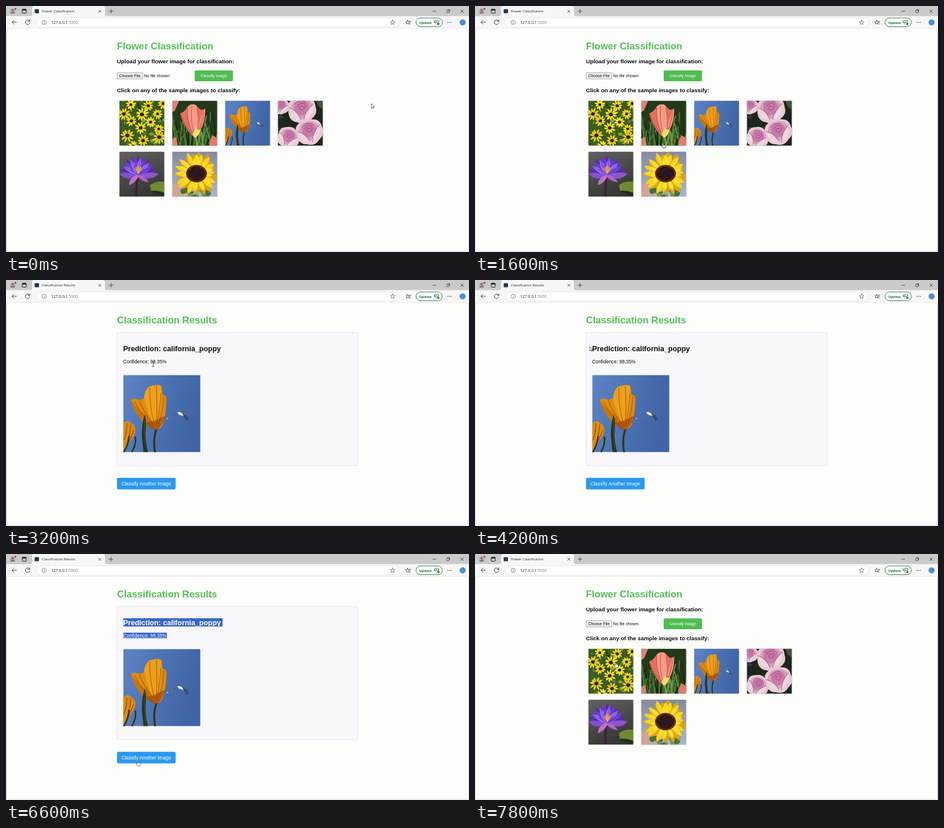
Recreate the animation shown at these times as an HTML page. Size 800 by 425 pixels, loop 8 s.

```html
<!DOCTYPE html>
<html lang="en">
<head>
<meta charset="utf-8">
<title>Flower Classification</title>
<style>
html, body { margin: 0; width: 100%; height: 100%; overflow: hidden; background: #efefef; }
#stage { display: block; width: 100vw; height: 100vh; }
text { font-family: "Liberation Sans", Arial, sans-serif; white-space: pre; }
.ui { font-family: "Open Sans", "Noto Sans", sans-serif; }
</style>
</head>
<body>
<svg id="stage" viewBox="0 0 800 425" xmlns="http://www.w3.org/2000/svg"></svg>
<script>
const LOOP = 8000, TICK = 200;
const GREEN = '#55c154', INK = '#0c0c0c';
const stage = document.getElementById('stage');

let seed = 7;
const rnd = (a = 0, b = 1) => {
  seed = (seed * 16807) % 2147483647;
  return a + (b - a) * seed / 2147483647;
};
const times = (n, f) => Array.from({ length: n }, (_, i) => f(i)).join('');
const rect = (x, y, w, h, fill, more = '') =>
  `<rect x="${x}" y="${y}" width="${w}" height="${h}" fill="${fill}" ${more}/>`;
const oval = (x, y, rx, ry, fill, more = '') =>
  `<ellipse cx="${x}" cy="${y}" rx="${rx}" ry="${ry}" fill="${fill}" ${more}/>`;
const dot = (x, y, r, fill, more) => oval(x, y, r, r, fill, more);
const shape = (d, fill, more = '') => `<path d="${d}" fill="${fill}" ${more}/>`;
const line = (d, color, w = 0.8, more = '') =>
  `<path d="${d}" fill="none" stroke="${color}" stroke-width="${w}" stroke-linecap="round" stroke-linejoin="round" ${more}/>`;
const text = (x, y, size, str, fill = INK, more = '') =>
  `<text x="${x}" y="${y}" font-size="${size}" fill="${fill}" ${more}>${str}</text>`;
const bold = (x, y, size, str, fill) => text(x, y, size, str, fill, 'font-weight="700"');
const ui = (x, y, size, str, fill, more = '') => text(x, y, size, str, fill, `class="ui" ${more}`);
const petals = (x, y, n, r, len, wid, fill, turn = 0, jitter = 0) => times(n, i => {
  const tip = r + len * (1 + rnd(-jitter, jitter));
  return `<g transform="translate(${x} ${y}) rotate(${turn + i * 360 / n + 40 * rnd(-jitter, jitter)})">` +
    shape(`M0 ${-r}Q${wid} ${-(r + tip) * 0.55} 0 ${-tip}Q${-wid} ${-(r + tip) * 0.55} 0 ${-r}`, fill) + '</g>';
});
const frame = (x, y, size, box, art) =>
  `<svg x="${x}" y="${y}" width="${size}" height="${size}" viewBox="0 0 ${box} ${box}">${art}</svg>`;

// Flower pictures: 78 units square, the poppy 133

function daisies() {
  const spots = [[20, 7], [50, 9], [8, 23], [39, 24], [66, 23], [21, 35], [37, 47],
    [14, 60], [68, 49], [54, 37], [41, 69], [69, 63], [24, 78], [76, 5]];
  return rect(0, 0, 78, 78, '#3d5b1c') +
    times(80, i => oval(rnd(0, 78), rnd(0, 78), rnd(1, 4), rnd(1, 3), ['#24380f', '#587d2c', '#86a23c'][i % 3])) +
    spots.map(([x, y], i) => {
      const s = 0.85 + (i % 4) * 0.12;
      return petals(x, y, 10, 1.5, 8.5 * s, 3.2, i % 3 ? '#f4d81d' : '#ffe62c', i * 13, 0.15) +
        oval(x, y, 2.9 * s, 2.6 * s, '#30200c');
    }).join('');
}

function tulip() {
  return rect(0, 0, 78, 78, '#24391a') +
    times(56, i => {
      const x = rnd(-3, 80), y = rnd(18, 66);
      return line(`M${x} 80Q${x + rnd(-3, 3)} ${y + 15} ${x + rnd(-9, 9)} ${y}`,
        ['#3f6a2a', '#6c9a4a', '#15240f', '#4b7a35'][i % 4], rnd(1, 2.4));
    }) +
    shape('M0 0H12L5 17L0 20Z', '#e08076') +
    shape('M65 78Q64 66 70 60Q77 63 80 70V78Z', '#e8776c') +
    shape('M0 78V66L7 63L10 78Z', '#d98372') +
    line('M40 61Q43 70 43 80', '#75a44b', 3) +
    shape('M39 64Q28 56 22 43Q16 32 14 22Q21 20 27 10Q34 4 42 8Q47 15 51 16L57 14Q58 34 48 52Q45 62 39 64Z', '#e4705f') +
    shape('M38 61Q26 42 27 10Q34 4 41 8Q49 30 43 55Z', '#f59c86') +
    shape('M45 54Q46 30 57 14Q58 36 48 52Z', '#f2917c') +
    line('M34 9Q31 35 38 58M27 12Q25 38 37 59M16 26Q22 46 36 58M54 21Q52 40 45 54M43 14Q47 34 44 52', '#c64d47', 1) +
    shape('M35 57Q39 53 41 45Q43 52 49 50Q46 62 39 64Z', '#f6dc6a');
}

function poppy() {
  return rect(0, 0, 133, 133, 'url(#sky)') +
    line('M57 94Q51 112 55 133', '#33360f', 3.4) +
    line('M56 90Q65 74 77 74M84 71Q92 63 102 67', '#34466a', 0.7) +
    oval(76, 75, 2, 1.2, '#b7b7ae') + oval(84, 71, 1.6, 2.4, '#6d716c') +
    shape('M93 65Q98 61 105 70Q98 71 93 65Z', '#f1f0e2') +
    line('M103 67L110 78M107 69L112 76', '#3a3c35', 1.5) +
    shape('M0 83Q9 76 15 84Q23 88 20 101Q15 110 7 122L0 133Z', '#dc8c12') +
    line('M3 129Q12 108 13 86M1 112Q7 98 6 84M8 119L18 96', '#a05508', 1.6) +
    line('M15 133Q23 119 21 107M1 133Q9 120 10 106', '#2a3413', 2.6) +
    shape('M13 43Q18 38 28 43L36 40Q37 25 45 20Q56 16 65 18Q68 27 67 33Q77 35 74 47Q74 70 67 87Q61 97 50 91Q35 85 28 73Q17 61 13 43Z', '#dd8c10') +
    shape('M36 40Q37 25 45 20Q56 16 65 18Q69 50 57 90Q43 72 36 40Z', '#eda01a') +
    shape('M13 43Q24 59 43 72Q51 82 55 93Q36 87 28 73Q17 61 13 43Z', '#c8750a') +
    line('M46 22Q45 56 55 88M57 19Q59 53 57 88M70 37Q69 66 59 90M28 44Q34 62 51 84M20 46Q30 68 48 86M65 33Q63 62 58 85', '#b05a06', 1.1) +
    shape('M38 82Q51 81 60 76L72 70Q67 90 57 95Q46 94 38 82Z', '#983f08', 'opacity=".6"') +
    shape('M37 69Q33 78 32 103L35 133H43Q37 112 39 91Q40 75 37 69Z', '#29350f') +
    line('M37 73Q35 94 39 126', '#53612b', 0.8);
}

function rose(x, y, r, turn) {
  return `<g transform="translate(${x} ${y}) rotate(${turn}) scale(${r / 20})">` +
    shape('M-19 1Q-22 -11 -11 -16Q-2 -23 7 -18Q19 -17 20 -5Q24 6 14 13Q6 23 -6 18Q-19 16 -19 1Z', '#e8c9d4') +
    shape('M-15 -4Q-12 -17 3 -16Q17 -14 15 -1Q12 13 -2 13Q-15 10 -15 -4Z', '#d8a0bd') +
    shape('M-10 -6Q-5 -14 4 -13Q13 -10 10 0Q6 9 -3 8Q-12 3 -10 -6Z', '#c97aa9') +
    shape('M-17 -1Q-8 0 -1 14Q-15 17 -17 -1Z', '#efd6de') +
    shape('M16 -7Q18 8 3 16Q3 5 16 -7Z', '#f0d8e0') +
    line('M-18 -3Q-7 0 -1 14M17 -9Q4 3 3 16', '#a9688f', 0.9) +
    line('M-6 -5Q-2 -11 4 -9Q8 -4 2 0Q-3 1 -3 -4Q0 -7 3 -4M-10 -8Q-4 -15 5 -12', '#a85487', 1.1) + '</g>';
}

function roses() {
  return rect(0, 0, 78, 78, '#1d261d') +
    times(26, i => oval(rnd(0, 78), rnd(0, 78), rnd(2, 6), rnd(1, 4), ['#33422f', '#101610', '#51604a'][i % 3])) +
    rose(5, 10, 14, 20) + rose(41, 16, 24, 0) + rose(18, 64, 19, 25) + rose(54, 54, 23, -8) +
    shape('M66 0L78 0V15Q69 12 66 0Z', '#44553f');
}

function lily() {
  const petal = (a, len, w, fill) => `<g transform="translate(32 40) rotate(${a})">` +
    shape(`M0 2Q${w} ${-len * 0.5} 0 ${-len}Q${-w} ${-len * 0.5} 0 2`, fill) +
    line(`M0 0V${-len + 3}`, '#4220a0', 0.6) + '</g>';
  const fan = (n, spread, len, w, fills) => times(n, i =>
    petal(spread * (2 * i / (n - 1) - 1), len, w, fills[i % fills.length]));
  return rect(0, 0, 78, 78, 'url(#pond)') +
    shape('M53 58Q62 50 78 52V74Q66 70 55 69Z', '#6f8b32') +
    shape('M54 68Q66 66 78 71V76Q64 75 54 68Z', '#252d1c') +
    line('M32 43Q28 62 30 80', '#3b2034', 3.6) +
    fan(9, 74, 34, 7, ['#5a2cc0', '#6b3ad0']) +
    fan(8, 60, 29, 7, ['#9a72ee', '#7446d8']) +
    shape('M31 41Q16 34 0 38Q8 48 20 46Z', '#8450d0') +
    shape('M33 41Q49 33 68 38Q59 48 46 46Z', '#8f55cc') +
    shape('M31 40Q16 46 17 58Q28 54 34 42Z', '#c070cc') +
    shape('M33 40Q46 43 51 53Q38 52 31 42Z', '#b263c5') +
    times(7, i => line(`M33 38L${27 + i * 2} ${29 - Math.sin(i * 0.5) * 4}`, i % 2 ? '#f4bb43' : '#e88e45', 1.3));
}

function sunflower() {
  return rect(0, 0, 78, 78, 'url(#haze)') +
    shape('M0 57Q12 52 24 64L27 78H0Z', '#d4a494') +
    times(16, i => oval(rnd(18, 78), rnd(65, 79), rnd(3, 7), rnd(2, 5), ['#456f38', '#6f9556', '#a7b8a4'][i % 3])) +
    line('M43 66V80', '#648643', 4) +
    petals(42, 38, 17, 11, 26, 9, '#dca50c', 9, 0.15) +
    petals(42, 38, 16, 11, 24, 8, '#f8d51e', 0, 0.18) +
    petals(42, 38, 13, 11, 17, 5, '#ffe137', 14, 0.18) +
    oval(42, 38, 18, 15, '#5b2c12') + oval(42, 38, 15, 12, '#32160d') +
    times(44, i => {
      const a = i * 2.4, r = 2.4 * Math.sqrt(i);
      return dot(42 + r * Math.cos(a), 38 + r * 0.88 * Math.sin(a), 0.55, i % 2 ? '#87441b' : '#1b0e0b');
    }) + oval(42, 38, 7, 4.7, '#1f1832');
}

// Pages

function browser() {
  const star = (x, y, r) => 'M' + Array.from({ length: 10 }, (_, i) => {
    const a = i * Math.PI / 5 - Math.PI / 2, k = i % 2 ? r * 0.45 : r;
    return `${x + k * Math.cos(a)} ${y + k * Math.sin(a)}`;
  }).join('L') + 'Z';
  return rect(0, 0, 800, 425, '#efefef') + rect(0, 0, 800, 18, '#cacaca') + rect(0, 17.5, 800, 21, '#f7f7f7') +
    shape('M41 18Q45 18 45 14V4Q45 0 49 0H167Q171 0 171 4V14Q171 18 175 18Z', '#f7f7f7') +
    rect(2, 38.5, 796, 384.5, '#fdfdfc', 'rx="4" stroke="#e2e2e2" stroke-width=".7"') +
    dot(11.5, 9, 5, '#b5b5b5') + dot(11.5, 7.2, 2.1, '#777') + shape('M7.7 13Q8 9.7 11.5 9.7Q15 9.7 15.3 13Z', '#777') +
    dot(16.3, 4.8, 1.6, '#cf2638') +
    rect(28, 5.5, 7, 7, 'none', 'rx="1.2" stroke="#222" stroke-width="1"') + rect(28, 5.5, 7, 2.3, '#222') +
    rect(49.5, 5.5, 7.5, 7, '#26344b', 'rx=".8"') +
    line('M160 7L164.3 11.3M164.3 7L160 11.3', '#333') +
    line('M178 9H185M181.5 5.5V12.5', '#333') +
    line('M737.5 9H742.5', '#222') + rect(761.5, 7.5, 4, 4, 'none', 'rx=".7" stroke="#222" stroke-width=".7"') +
    line('M763 6.2H766.6V10', '#222', 0.7) + line('M785.7 6.7L790.3 11.3M790.3 6.7L785.7 11.3', '#222') +
    line('M18 28H10.5M13.8 24.5L10.3 28L13.8 31.5', '#333', 0.9) +
    line('M40.8 26A4 4 0 1 0 41.3 29M41.2 23.8V26.5H38.4', '#333', 0.9) +
    rect(52.5, 20.3, 627.5, 16, '#fff', 'rx="8" stroke="#dedede" stroke-width=".7"') +
    dot(66, 28.3, 3.8, 'none', 'stroke="#555" stroke-width=".7"') + line('M66 28V30.3M66 26.3V26.4', '#555') +
    ui(78, 30.9, 6.8, '127.0.0.1<tspan fill="#777">:5000</tspan>', '#222') +
    line(star(668, 28.4, 4.4), '#555', 0.7) + line(star(694, 28.2, 3.6), '#333', 0.7) +
    line('M697 26.3H699.5M697.5 28.5H699M696.5 31H699', '#333', 0.7) +
    rect(708.5, 20.7, 45.5, 15, '#fbfefb', 'rx="7.5" stroke="#388546" stroke-width="1"') +
    ui(714, 30.5, 5.9, 'Update', '#1c6b35', 'font-weight="700"') +
    line('M743.7 31.7L740.3 28Q738.8 25.6 741 24.6Q742.8 24 743.8 25.8Q745.2 24 747 24.8Q749 26 747.2 28.2M740 28H742L743 26.8L744.5 29L745.3 28H747', '#28352b') +
    dot(747, 31, 2, '#2b8b3a') +
    [763.8, 766.7, 769.6].map(x => dot(x, 28.3, 0.75, '#222')).join('') + dot(789, 28.3, 5.3, '#508cdb');
}

const THUMB = 78.2;
const thumbAt = i => [195.7 + (i % 4) * 91.3, i < 4 ? 163.4 : 251.5];

function home() {
  const art = [daisies(), tulip(), poppy(), roses(), lily(), sunflower()];
  return ui(62, 11.1, 5.95, 'Flower Classification', '#222') +
    bold(191.7, 75.4, 16.66, 'Flower Classification', GREEN) +
    bold(191.7, 99.2, 9.75, 'Upload your flower image for classification:') +
    rect(192, 115.2, 44.5, 10.8, '#efefef', 'rx="1" stroke="#777" stroke-width=".6"') +
    text(195.5, 122.9, 6.94, 'Choose File') + text(238.8, 122.9, 6.94, 'No file chosen') +
    rect(326, 111.2, 66.2, 18.8, '#50bd52', 'rx="2.2"') + text(336.3, 123, 6.94, 'Classify Image', '#fff') +
    bold(191.7, 149.2, 9.75, 'Click on any of the sample images to classify:') +
    art.map((a, i) => {
      const [x, y] = thumbAt(i);
      return frame(x, y, THUMB, i === 2 ? 133 : 78, a) +
        rect(x, y, THUMB, THUMB, 'none', 'rx="2" stroke="#d9d9d9" stroke-width=".9"');
    }).join('');
}

const RESULT = [
  fill => bold(202.5, 122.6, 12.5, 'Prediction: california_poppy', fill),
  fill => text(202.5, 143.5, 8.333, 'Confidence: 98.35%', fill)
];
const LINES = [[202.5, 111, 172, 14.5], [202.5, 135.7, 75.5, 9.9]];
const BUTTON = [191.8, 341.8, 101.2, 20];

function results() {
  return ui(62, 11.1, 5.95, 'Classification Results', '#222') +
    bold(191.7, 75.4, 16.66, 'Classification Results', GREEN) +
    rect(191.8, 90.8, 416.4, 230, '#f8f7fa', 'rx="2.5" stroke="#dddde3" stroke-width=".7"') +
    RESULT.map(put => put(INK)).join('') +
    LINES.map(([x, y, w, h], i) =>
      `<clipPath id="clip${i}">${rect(x, y, 0, h, '#000', `id="mark${i}"`)}</clipPath>` +
      `<g clip-path="url(#clip${i})">${rect(x, y, w, h, '#3666cb')}${RESULT[i]('#fff')}</g>`).join('') +
    frame(202.5, 164.2, 133.3, 133, poppy()) +
    rect(...BUTTON, '#2a99ef', 'rx="2.2"') +
    text(199.5, 354.8, 8.333, 'Classify Another Image', '#fff');
}

const gradient = (id, dir, a, b) =>
  `<linearGradient id="${id}" ${dir}><stop stop-color="${a}"/><stop offset="1" stop-color="${b}"/></linearGradient>`;
const OUTLINE = 'stroke="#222" stroke-width=".65"';

stage.innerHTML = '<defs>' + gradient('sky', 'y2=".25"', '#5c83c5', '#4064a6') +
  gradient('pond', 'x2=".4" y2="1"', '#626261', '#373736') +
  gradient('haze', 'x2="0" y2="1"', '#858b9d', '#a6b6d0') + '</defs>' +
  browser() + `<g id="home">${home()}</g><g id="results">${results()}</g>` +
  '<g id="pointer">' +
  `<g id="arrow">${shape('M0 0V7.5L1.8 5.9L3 8.5L4.2 8L3 5.4H5.3Z', '#fff', OUTLINE)}</g>` +
  `<g id="hand">${shape('M-.8 .5Q0 -.6 .8 .5V3.6L4 4.2Q5 4.5 4.8 5.8L4 9H-.3L-3 5.8Q-2.8 4.5 -.8 5.7Z', '#fff', OUTLINE)}</g>` +
  `<g id="beam">${line('M-1.5 0H1.5M0 0V8M-1.5 8H1.5', '#222', 0.7)}</g></g>`;

// Pointer moves: first tick, last tick, then where it rests
const START = [631.5, 168.8];
const MOVES = [
  [400, 600, 345, 238], [1000, 1000, 332, 237], [1600, 1600, 324.7, 236.5], [2000, 2200, 401, 214],
  [2600, 3600, 203, 116], [4200, 4200, 198.3, 115], [4600, 5600, 268.5, 159.8], [5800, 6000, 243, 387],
  [6400, 6600, 227.7, 357], [6800, 7400, 234, 353], [7600, 7800, 243, 187]
];
const RESULTS_IN = 2400, SELECT_FROM = 4600, HOME_IN = 7000;

const byId = id => document.getElementById(id);
const show = (id, on) => byId(id).setAttribute('display', on ? 'inline' : 'none');
const clamp = (v, lo, hi) => Math.min(hi, Math.max(lo, v));
const smooth = u => u * u * (3 - 2 * u);
const inside = (px, py, [x, y, w, h]) => px >= x && px <= x + w && py >= y && py <= y + h;

function pointerAt(t) {
  let [x, y] = START;
  for (const [from, to, x1, y1] of MOVES) {
    const k = smooth(clamp((t - from + TICK) / (to - from + TICK), 0, 1));
    x += (x1 - x) * k;
    y += (y1 - y) * k;
  }
  return [x, y];
}

function pointerKind(x, y, onResults) {
  if (!onResults) {
    return [0, 1, 2, 3, 4, 5].some(i => inside(x, y, [...thumbAt(i), THUMB, THUMB])) ? 'hand' : 'arrow';
  }
  if (inside(x, y, BUTTON)) return 'hand';
  return LINES.some(box => inside(x, y, box)) ? 'beam' : 'arrow';
}

function selection(t, x, y) {
  if (t < SELECT_FROM) return [0, 0];
  const [[left, , full], [, top, last, h]] = LINES;
  const reach = Math.max(0, x - left);
  if (y > top + h) return [full, last];
  return y > 128 ? [full, Math.min(reach, last)] : [reach, 0];
}

function draw(ms) {
  const t = Math.floor((ms % LOOP) / TICK) * TICK;
  const [x, y] = pointerAt(t);
  const onResults = t >= RESULTS_IN && t < HOME_IN;
  const kind = pointerKind(x, y, onResults);
  show('home', !onResults);
  show('results', onResults);
  ['arrow', 'hand', 'beam'].forEach(id => show(id, id === kind));
  byId('pointer').setAttribute('transform', `translate(${x} ${y})`);
  selection(t, x, y).forEach((w, i) => byId('mark' + i).setAttribute('width', w));
}

const start = performance.now();
function tick() {
  draw(performance.now() - start);
  requestAnimationFrame(tick);
}
tick();
</script>
</body>
</html>
```
